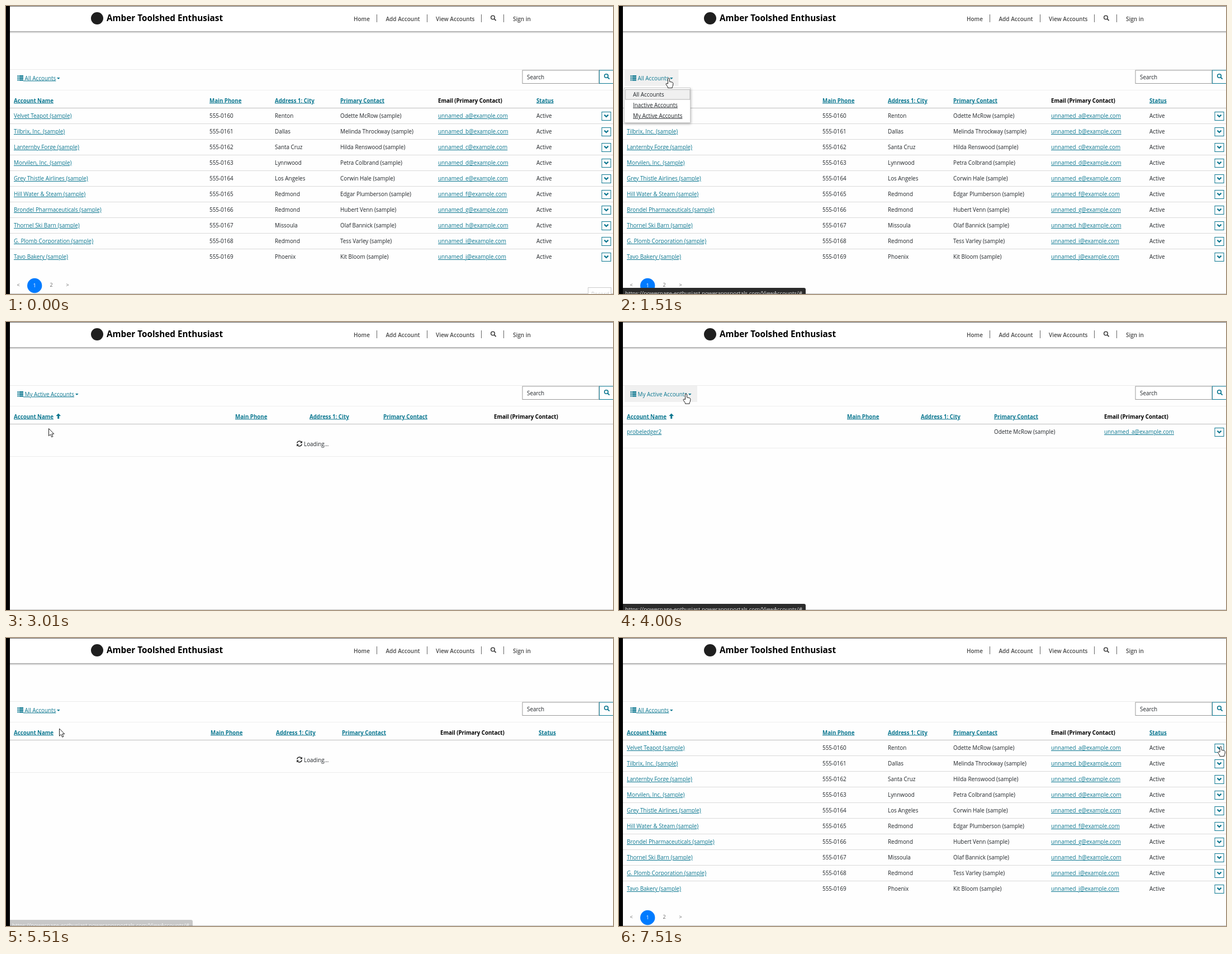
Recreate the animation shown at these times as an HTML page. Size 1086 px wide and 515 px high, loop 8000 ms.

```html
<!DOCTYPE html>
<html lang="en">
<head>
<meta charset="utf-8">
<title>Accounts list</title>
<style>
html, body { margin: 0; width: 100%; height: 100%; overflow: hidden; background: #fefefe; }
svg { display: block; width: 1086px; height: 515px; font: 9.9px "Open Sans", "Noto Sans", sans-serif; }
text { fill: #212529; }
.b { font-weight: 700; font-size: 9.7px; fill: #000; }
.nav { font-weight: 600; font-size: 10px; fill: #484848; }
.title { font-weight: 700; font-size: 15.3px; fill: #000; }
.teal { fill: #0b7790; }
.u { text-decoration: underline; }
.line { fill: none; stroke: #0b7790; }
.url { font-size: 9.73px; fill: #e4e4e4; }
.tip { font-size: 8.5px; fill: #fff; }
.page { fill: #666; font-size: 9px; text-anchor: middle; }
</style>
</head>
<body>
<svg id="stage" viewBox="0 0 1086 515"><g id="base"></g><g id="live"></g></svg>
<script>
const LOOP = 8000;
const HEADS = ['Account Name', 'Main Phone', 'Address 1: City', 'Primary Contact', 'Email (Primary Contact)', 'Status'];
const COLS = [14, 364, 481, 598, 773, 949];
const WIDE = [14, 366, 483, 601, 777, 953];
const MINE = [14, 408, 540, 671, 868];
const MINE_WIDE = [14, 410, 543, 675, 873];
const ROWS = [
  ['Velvet Teapot', 'Renton', 'Odette McRow'],
  ['Tilbrix, Inc.', 'Dallas', 'Melinda Throckway'],
  ['Lanternby Forge', 'Santa Cruz', 'Hilda Renswood'],
  ['Morvilen, Inc.', 'Lynnwood', 'Petra Colbrand'],
  ['Grey Thistle Airlines', 'Los Angeles', 'Corwin Hale'],
  ['Hill Water &amp; Steam', 'Redmond', 'Edgar Plumberson'],
  ['Brondel Pharmaceuticals', 'Redmond', 'Hubert Venn'],
  ['Thornel Ski Barn', 'Missoula', 'Olaf Bannick'],
  ['G. Plomb Corporation', 'Redmond', 'Tess Varley'],
  ['Tavo Bakery', 'Phoenix', 'Kit Bloom']
];
const VIEWS = ['All Accounts', 'Inactive Accounts', 'My Active Accounts'];
const URL_TEXT = 'https://powerpage-enthusiast.powerappsportals.com/ViewAccounts/#';

const text = (x, y, s, cls = '') => `<text x="${x}" y="${y}" class="${cls}">${s}</text>`;
const rect = (x, y, w, h, fill, more = '') => `<rect x="${x}" y="${y}" width="${w}" height="${h}" fill="${fill}" ${more}/>`;
const path = (d, more) => `<path d="${d}" ${more}/>`;
const rule = (y, color) => rect(7, y, 1079, 1, color);
const link = (x, y, s) => text(x, y, s, 'teal u');
const mail = i => `unnamed_${'abcdefghij'[i]}@example.com`;
const sample = s => s + ' (sample)';

function lens(x, y, color) {
  return `<g fill="none" stroke="${color}"><circle cx="${x - 1}" cy="${y - 1}" r="3.3" stroke-width="1.6"/>` +
    path(`M${x + 1.6} ${y + 1.6}l3 3`, 'stroke-width="2"') + '</g>';
}

function chevron(y) {
  return rect(1066, y - 6.5, 16, 15, '#fff', 'class="line"') +
    path(`M1070.5 ${y - 1.4}l3.5 3.4 3.5-3.4`, 'class="line" stroke-width="2.2"');
}

function base() {
  let s = rect(0, 0, 7, 515, '#000') + rect(7, 0, 1079, 45, '#fff') + rule(0, '#666');
  s += ['#a9a9a9', '#c8c8c8', '#e0e0e0', '#f2f2f2'].map((c, i) => rule(45 + i, c)).join('');
  s += '<circle cx="163" cy="22" r="11" fill="#1f1f1f"/>' + text(180, 27, 'Amber Toolshed Enthusiast', 'title');
  s += text(622, 26.5, 'Home', 'nav') + text(679.5, 26.5, 'Add Account', 'nav') +
    text(769, 26.5, 'View Accounts', 'nav') + text(907, 26.5, 'Sign in', 'nav');
  s += [663, 753, 850, 890].map(x => rect(x, 15, 1, 14, '#666')).join('') + lens(872, 21.5, '#444');
  return s + rule(113, '#ebebeb') + rule(150, '#efefef') + rule(182, '#bdbdbd') + rule(514, '#c4c4c4') +
    rect(924, 115, 137, 23.5, '#fff', 'stroke="#999"') + text(932, 131, 'Search') +
    rect(1061.5, 115, 30, 23.5, '#fff', 'class="line"') + lens(1075, 126, '#0b7790');
}

function picker(label, hot, under) {
  const end = label ? 124 : 91;
  let s = hot ? rect(10, 114, end + 16 - (label ? 0 : 0.5) - 10, 29, '#f0f0f0') : '';
  for (let i = 0; i < 4; i++) {
    const y = 124 + i * 2.6;
    s += rect(20.5, y, 2, 1.9, '#0b7790') + rect(23.5, y, 7.5, 1.9, '#0b7790');
  }
  return s + text(31, 132.5, '&#160;' + VIEWS[label], under ? 'teal u' : 'teal') +
    path(`M${end} 128h5.6l-2.8 3z`, 'fill="#0b7790"');
}

function heads(cols, sorted) {
  let s = cols.map((x, i) => text(x, 172.5, HEADS[i], i === 4 ? 'b' : 'b teal u')).join('');
  if (sorted) s += path('M93.7 163.5l4.4 4.6h-2.9v5h-3v-5h-2.9z', 'class="teal"');
  return s;
}

function allRows() {
  let s = heads(COLS);
  ROWS.forEach(([name, city, who], i) => {
    const y = 200 + i * 28;
    if (i) s += rule(y - 18, '#dadada');
    s += link(14, y, sample(name)) + text(364, y, '555-016' + i) + text(481, y, city) +
      text(598, y, sample(who)) + link(773, y, mail(i)) + text(949, y, 'Active') + chevron(y - 4);
  });
  s += '<circle cx="51.2" cy="500" r="13.2" fill="#007bff"/>';
  [[22, '&lt;'], [51.2, '1'], [81, '2'], [110, '&gt;']].forEach(([x, c]) => {
    s += `<text x="${x}" y="${c === '1' ? 502.5 : 501.5}" class="page" ${c === '1' ? 'style="fill:#fff"' : ''}>${c}</text>`;
  });
  return s;
}

function mineRows() {
  return heads(MINE, true) + link(14, 200, 'probeledger2') + text(671, 200, sample(ROWS[0][2])) +
    link(868, 200, mail(0)) + chevron(196) + rule(225, '#ececec');
}

function loading(cols, sorted) {
  return heads(cols, sorted) + rule(240, '#ececec') + text(533, 222, 'Loading...') +
    path('M520.8 216.6a4.3 4.3 0 0 1 7.6-2M529.2 218.4a4.3 4.3 0 0 1-7.6 2', 'fill="none" stroke="#222" stroke-width="1.5"') +
    path('M529.9 212.6v4h-4zM520.1 222.4v-4h4z', 'fill="#222"');
}

function menu(on) {
  let s = rect(9.5, 146.5, 118, 62, '#fff', 'stroke="#ccc" style="filter:drop-shadow(1px 2px 2px #0004)"');
  VIEWS.forEach((v, i) => {
    const y = 149.5 + i * 18.9, lit = on.includes(i);
    if (lit) s += rect(11.5, y, 115.5, 17.6, '#f0f0f0', 'stroke="#b4b4b4"');
    s += text(25, y + 12.3, v, lit ? '' : 'u');
  });
  return s;
}

const status = o => `<g opacity="${o}">` + path('M7 504h324q3 0 3 3v8H7z', 'fill="#2b2b2b"') + text(11, 517, URL_TEXT, 'url') + '</g>';

const tooltip = (x, y, o) => rect(x, y, 57.5, 16.5, '#000', `opacity="${o}"`) + text(x + 5, y + 11.6, 'View details', 'tip');

const recorder = () => rect(1041.5, 503.5, 41, 14, '#fff', 'stroke="#ccc"') +
  '<text x="1047" y="519" style="fill:#c8c8c8">Record</text>';

const HAND = 'M-1.5 10V1.6a1.5 1.5 0 0 1 3 0V6.3l4.4 .9q2 .6 2 2.6l-.6 4-1.1 2v1.8H-1.6v-1.5l-3.2-4.9q-.5-1.6.8-1.7z';
const ARROW = 'M.5 .5v13.2l3.1-2.8 2.1 4.8 2.2-1-2.1-4.6h4z';
const cursor = (x, y, hand) => path(hand ? HAND : ARROW,
  `transform="translate(${x} ${y})" fill="#fff" stroke="#222" stroke-linejoin="round"`);
const hand = (x, y) => cursor(x, y, true);
const glow = (x, y) => `<circle cx="${x}" cy="${y}" r="10.5" fill="#f5e728" opacity=".75"/>`;

const plain = () => picker(0, false, true) + allRows();
const SCENES = [
  [0, () => plain() + recorder()],
  [500, () => plain() + tooltip(139.5, 243.5, .8) + hand(113, 242)],
  [1000, () => picker(0, true) + allRows() + hand(88.5, 130.5)],
  [1510, () => picker(0, true) + allRows() + menu([0]) + status(1) + hand(89, 129)],
  [2010, () => picker(0, true) + allRows() + menu([0, 1]) + status(1) + hand(78, 181)],
  [2500, () => picker(0, true, true) + allRows() + menu([0, 2]) + status(1) + glow(74.5, 196) + hand(74, 194)],
  [3010, () => picker(2, false, true) + loading(MINE_WIDE, true) + cursor(76, 190)],
  [3510, () => picker(2, false, true) + mineRows() + cursor(104, 156)],
  [4000, () => picker(2, true) + mineRows() + status(1) + hand(120, 128.5)],
  [4500, () => picker(2, true) + mineRows() + menu([2]) + status(1) + hand(119, 128.5)],
  [5010, () => picker(2, true, true) + mineRows() + menu([0, 2]) + status(1) + hand(93, 162)],
  [5510, () => picker(0, false, true) + loading(WIDE) + status(.25) + cursor(95, 161.5)],
  [6010, () => plain() + tooltip(123, 187.3, .23) + hand(98, 227.5)],
  [6510, () => plain() + cursor(848, 286)],
  [7010, () => plain() + cursor(1044, 203)],
  [7510, () => plain() + hand(1076.5, 194)]
];

const live = document.getElementById('live');
document.getElementById('base').innerHTML = base();
let shown = null;

function draw(t) {
  const scene = SCENES.filter(s => s[0] <= t).pop();
  if (scene !== shown) live.innerHTML = (shown = scene)[1]();
}

const start = performance.now();
function tick() {
  draw((performance.now() - start) % LOOP);
  requestAnimationFrame(tick);
}
tick();
</script>
</body>
</html>
```
